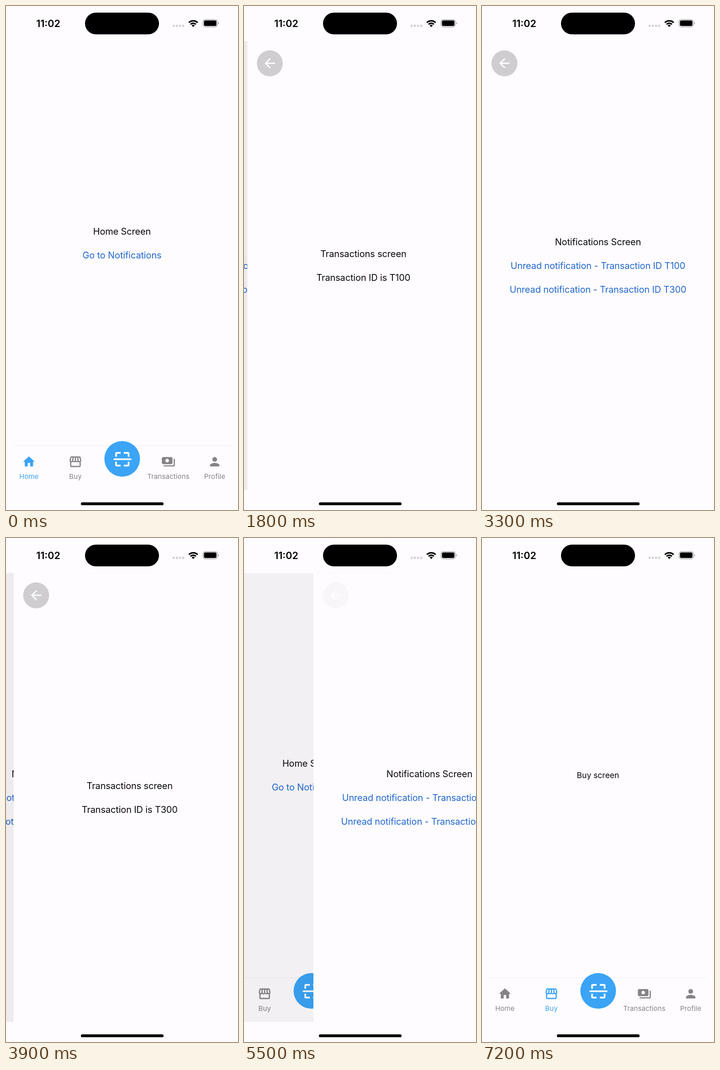
An HTML page for the animation above (8 s loop, 508x1102 px).

```html
<!DOCTYPE html>
<html lang="en">
<head>
<meta charset="utf-8">
<title>App navigation</title>
<style>
  html, body { margin: 0; width: 100%; height: 100%; overflow: hidden; background: #fefcff; }
  svg { display: block; width: 100%; height: 100%; font-family: Inter, "Liberation Sans", sans-serif; }
  text { text-anchor: middle; }
  .body { font-size: 20px; letter-spacing: -.15px; fill: #09080a; }
  .small { font-size: 17.5px; fill: #09080a; }
  .link { fill: #2168ce; }
  .tab { font-size: 15px; letter-spacing: .12px; }
  .clock { font-size: 21.5px; font-weight: 600; }
</style>
</head>
<body>
<svg id="stage" viewBox="0 0 508 1102"></svg>
<script>
const W = 508, TOP = 76.5, BOTTOM = 1058, LOOP = 8000, STEP = 100;
const BG = '#fefcff', BLUE = '#3ba4f6', GREY = '#858386';

const ICONS = {
  home: 'M10 20v-6h4v6h5v-8h3L12 3 2 12h3v8z',
  store: 'M21.9 8.89l-1.05-4.37c-.22-.9-1-1.52-1.91-1.52H5.05c-.9 0-1.69.63-1.9 1.52L2.1 8.89c-.24 1.02-.02 2.06.62 2.88.08.11.19.19.28.29V19c0 1.1.9 2 2 2h14c1.1 0 2-.9 2-2v-6.94c.09-.09.2-.18.28-.28.64-.82.87-1.87.62-2.89zm-2.99-3.9l1.05 4.37c.1.42.01.84-.25 1.17-.14.18-.44.47-.94.47-.61 0-1.14-.49-1.21-1.14L16.98 5zM13 5h1.96l.54 4.52c.05.39-.07.78-.33 1.07-.22.26-.54.41-.95.41-.67 0-1.22-.59-1.22-1.31zM8.49 9.52L9.04 5H11v4.69c0 .72-.55 1.31-1.29 1.31-.34 0-.65-.15-.89-.41-.25-.29-.37-.68-.33-1.07zm-4.45-.16L5.05 5h1.97l-.58 4.86c-.08.65-.6 1.14-1.21 1.14-.49 0-.8-.29-.93-.47-.27-.32-.36-.75-.26-1.17zM5 19v-6.03c.08.01.15.03.23.03.87 0 1.66-.36 2.24-.95.6.6 1.4.95 2.31.95.87 0 1.65-.36 2.23-.93.59.57 1.39.93 2.29.93.84 0 1.64-.35 2.24-.95.58.59 1.37.95 2.24.95.08 0 .15-.02.23-.03V19z',
  money: 'M19 14V6c0-1.1-.9-2-2-2H3c-1.1 0-2 .9-2 2v8c0 1.1.9 2 2 2h14c1.1 0 2-.9 2-2zm-9-1c-1.66 0-3-1.34-3-3s1.34-3 3-3 3 1.34 3 3-1.34 3-3 3zm13-6v11c0 1.1-.9 2-2 2H4v-2h17V7z',
  person: 'M12 12c2.21 0 4-1.79 4-4s-1.79-4-4-4-4 1.79-4 4 1.79 4 4 4zm0 2c-2.67 0-8 1.34-8 4v2h16v-2c0-2.66-5.33-4-8-4z',
  back: 'M20 11H7.83l5.59-5.59L12 4l-8 8 8 8 1.41-1.41L7.83 13H20z'
};

const rect = (x, y, w, h, r, attrs = '') =>
  `<rect x="${x}" y="${y}" width="${w}" height="${h}" rx="${r}" ${attrs}/>`;
const label = (str, y, cls = 'body', id = '') =>
  `<text id="${id}" class="${cls}" x="254" y="${y}">${str}</text>`;
const icon = (name, cx, cy, scale) =>
  `<path d="${ICONS[name]}" transform="translate(${cx} ${cy}) scale(${scale}) translate(-12 -12)"/>`;
const tab = (id, name, str, x) =>
  `<g id="${id}" fill="${GREY}">${icon(name, x, 996.5, 1.2926)}<text class="tab" x="${x}" y="1033.5">${str}</text></g>`;
const backButton = id =>
  `<g id="${id}"><circle cx="49.2" cy="125.4" r="28.4" fill="#cfcdd0"/><g fill="#fff">${icon('back', 49.2, 125.2, 1.42)}</g></g>`;
const card = (id, content) =>
  `<g id="${id}">${rect(0, TOP, W, BOTTOM - TOP, 0, `fill="${BG}"`)}${content}` +
  `${rect(0, TOP, W, BOTTOM - TOP, 0, `id="${id}Shade" opacity="0"`)}</g>`;
const wifiArc = r => {
  const k = r * Math.SQRT1_2;
  return `M${410 - k} ${46 - k}A${r} ${r} 0 0 1 ${410 + k} ${46 - k}`;
};

const scanButton = `
  <circle cx="254.4" cy="990.2" r="39" fill="${BLUE}"/>
  <g fill="none" stroke="#fff" stroke-width="3.7">
    <path d="M241 985.5V978.5q0-1.3 1.3-1.3H251M258 977.2h9.2q1.3 0 1.3 1.3v7M241 996.5v7q0 1.3 1.3 1.3H251M258 1004.8h9.2q1.3 0 1.3-1.3v-7"/>
    <path d="M237 991H273" stroke-linecap="round"/>
  </g>`;

const homeCard = card('home',
  `<g id="homeTab">${label('Home Screen', 500)}${label('Go to Notifications', 552, 'body link', 'goLink')}</g>
  <g id="buyTab">${label('Buy screen', 525, 'small')}</g>
  <path d="M17 961.5H491" stroke="#efeef1" stroke-width="1.5"/>` +
  tab('tabHome', 'home', 'Home', 50.2) + tab('tabBuy', 'store', 'Buy', 152) +
  tab('tabMoney', 'money', 'Transactions', 355.5) + tab('tabPerson', 'person', 'Profile', 457) + scanButton);

const noticeCard = card('notice', backButton('noticeBack') +
  label('Notifications Screen', 523) +
  label('Unread notification - Transaction ID T100', 575, 'body link', 'link100') +
  label('Unread notification - Transaction ID T300', 627, 'body link', 'link300'));

const detailCard = card('detail', backButton('detailBack') +
  label('Transactions screen', 549) + label('', 601, 'body', 'detailId'));

const statusBar = `
  <text class="clock" x="92.5" y="46">11:02</text>
  ${rect(173, 14.5, 162, 47.5, 23.7)}
  ${[0, 1, 2, 3].map(i => rect(364.8 + i * 7, 41, 4.6, 4.6, 1.5, 'fill="#cfcdd0"')).join('')}
  <path d="${wifiArc(13.6)}${wifiArc(8.3)}" fill="none" stroke="#000" stroke-width="3.3"/>
  <path d="${wifiArc(4.9)}L410 46z"/>
  ${rect(431.4, 29.6, 31.4, 16.2, 5, 'fill="none" stroke="#a3a1a4" stroke-width="1.3"')}
  ${rect(433.4, 31.6, 27.4, 12.2, 3.2)}
  <path d="M464.4 35.2q2 .8 2 2.6t-2 2.6z" fill="#a3a1a4"/>
  ${rect(164, 1085.2, 181, 6.4, 3.2)}`;

const stage = document.getElementById('stage');
stage.innerHTML = `
  <clipPath id="area">${rect(0, TOP, W, BOTTOM - TOP, 0)}</clipPath>
  ${rect(0, 0, W, 1102, 0, `fill="${BG}"`)}
  <g clip-path="url(#area)">${homeCard}${noticeCard}${detailCard}</g>${statusBar}`;

const el = {};
stage.querySelectorAll('[id]').forEach(node => { if (node.id) el[node.id] = node; });

// Critically damped spring: share of the way still to go.
const rest = ms => {
  const x = Math.max(0, ms) / 1000 * Math.sqrt(1000 / 3);
  return Math.exp(-x) * (1 + x);
};
const shown = (t, push, pop) => t < pop ? 1 - rest(t - push) : rest(t - pop);

// Opacity of a link that dims while held, then fades back.
const pressed = (t, down, up) => {
  if (t < down) return 1;
  const k = Math.min(1, Math.max(0, (t - up) / 250));
  return .2 + .8 * k * k * (3 - 2 * k);
};

const place = (id, x) => el[id].setAttribute('transform', `translate(${x.toFixed(2)} 0)`);
const fade = (id, a) => el[id].setAttribute('opacity', a.toFixed(4));
const show = (id, on) => el[id].setAttribute('display', on ? 'inline' : 'none');
const tint = (id, on) => el[id].setAttribute('fill', on ? BLUE : GREY);

function draw(t) {
  const notice = shown(t, 550, 5440);
  const detail = t < 3500 ? shown(t, 1460, 2766) : shown(t, 3613, 4751);

  place('home', -.3 * W * notice);
  place('notice', W * (1 - notice) - .3 * W * detail);
  place('detail', W * (1 - detail));
  fade('homeShade', .07 * notice);
  fade('noticeShade', .07 * detail);

  fade('goLink', pressed(t, 500, 550));
  fade('link100', pressed(t, 1400, 1460));
  fade('link300', pressed(t, 3500, 3613));
  fade('noticeBack', t < 5300 ? 1 : .12);
  fade('detailBack', (t >= 2700 && t < 3500) || t >= 4700 ? .12 : 1);
  el.detailId.textContent = 'Transaction ID is ' + (t < 3500 ? 'T100' : 'T300');

  const buy = t >= 7200;
  show('homeTab', !buy);
  show('buyTab', buy);
  tint('tabHome', !buy);
  tint('tabBuy', buy);
}

const start = performance.now();
function tick() {
  const t = (performance.now() - start) % LOOP;
  draw(Math.floor(t / STEP) * STEP);
  requestAnimationFrame(tick);
}
tick();
</script>
</body>
</html>
```
